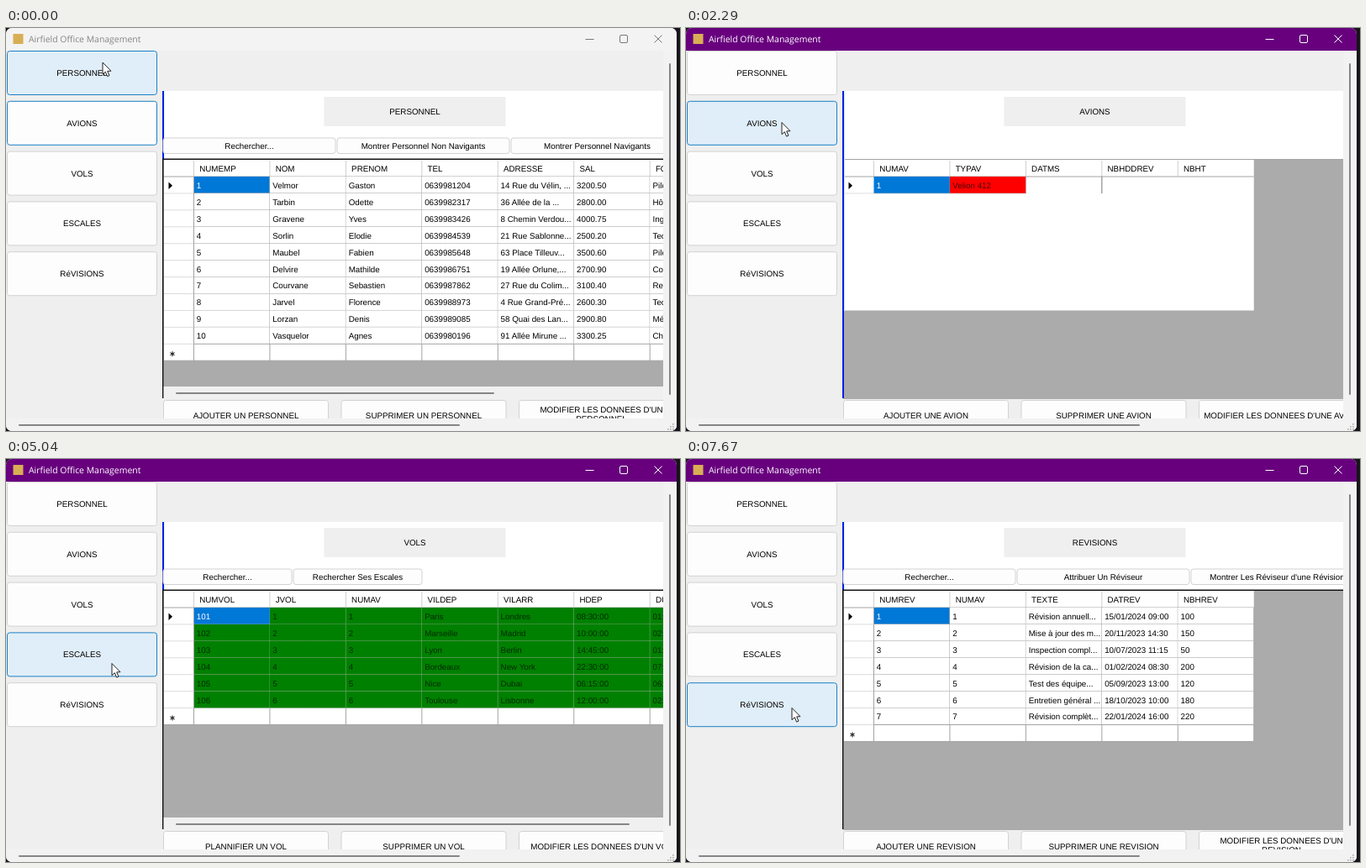
These frames come from a looping animation (802x480 px, 7.71 s). An HTML page:

```html
<!DOCTYPE html>
<html lang="fr">
<head>
<meta charset="utf-8">
<title>Airfield Office Management</title>
<style>
  html, body { margin: 0; width: 100%; height: 100%; overflow: hidden; background: #17141a; }
  svg { display: block; }
  text { font: 9.8px "Liberation Sans", Arial, sans-serif; text-rendering: geometricPrecision; white-space: pre; }
  .caption { font: 10.45px "Open Sans", "Noto Sans", sans-serif; }
  .btn rect { fill: #fdfdfd; stroke: #d2d2d2; }
  .btn.focus rect { stroke: #1a7fc4; }
  .btn.hover rect { fill: #e0eef9; stroke: #1a7fc4; }
  .btn.down rect { fill: #cce4f7; stroke: #1a609c; }
</style>
</head>
<body>
<svg id="stage" width="802" height="480" viewBox="0 0 802 480"></svg>
<script>
const LOOP = 7710;
const COL0 = 223.5, COL_W = 90.45, ROW0 = 177, ROW_H = 19.93;
const GRID_LINE = '#a3a3a3';
const MENU = ['PERSONNEL', 'AVIONS', 'VOLS', 'ESCALES', 'RéVISIONS'];

const PAGES = [
  {
    title: 'PERSONNEL', barW: 205, bar: ['Rechercher...', 'Montrer Personnel Non Navigants', 'Montrer Personnel Navigants'],
    actions: ['AJOUTER UN PERSONNEL', 'SUPPRIMER UN PERSONNEL', "MODIFIER LES DONNEES D'UN|PERSONNEL"],
    scrollEnd: 580,
    head: 'NUMEMP|NOM|PRENOM|TEL|ADRESSE|SAL|FONCTION',
    rows: [
      '1|Velmor|Gaston|0639981204|14 Rue du Vélin, ...|3200.50|Pilote',
      '2|Tarbin|Odette|0639982317|36 Allée de la ...|2800.00|Hôtesse',
      '3|Gravene|Yves|0639983426|8 Chemin Verdou...|4000.75|Ingénieur',
      '4|Sorlin|Elodie|0639984539|21 Rue Sablonne...|2500.20|Technicien',
      '5|Maubel|Fabien|0639985648|63 Place Tilleuv...|3500.60|Pilote',
      '6|Delvire|Mathilde|0639986751|19 Allée Orlune,...|2700.90|Commercial',
      '7|Courvane|Sebastien|0639987862|27 Rue du Colim...|3100.40|Responsable',
      '8|Jarvel|Florence|0639988973|4 Rue Grand-Pré...|2600.30|Technicien',
      '9|Lorzan|Denis|0639989085|58 Quai des Lan...|2900.80|Mécanicien',
      '10|Vasquelor|Agnes|0639980196|91 Allée Mirune ...|3300.25|Chef'
    ]
  },
  {
    title: 'AVIONS', barW: 205, bar: ['Rechercher...', 'Rechercher Ses Vols', 'Rechercher Ses Révisions'],
    actions: ['AJOUTER UNE AVION', 'SUPPRIMER UNE AVION', "MODIFIER LES DONNEES D'UNE AVION"],
    fill: i => i === 2 ? '#ffff00' : '#ff0000',
    ink: i => i === 2 ? '#000' : '#4d0000',
    head: 'NUMAV|TYPAV|DATMS|NBHDDREV|NBHT',
    rows: [
      '1|Velion 412|12/05/2020 14:30|100|1500',
      '2|Norvel K250|08/11/2022 09:15|200|3200',
      '3|Tarena 208|22/07/2021 16:45|50|800',
      '4|Valecrest T730 ...|30/03/2020 11:00|300|5000',
      '5|Olmarez J260|15/12/2019 18:20|150|2200',
      '6|Karvandel PLX4...|05/01/2024 07:55|120|1800',
      '7|Velion 858|19/08/2018 21:10|400|7000'
    ]
  },
  {
    title: 'VOLS', barW: 153, bar: ['Rechercher...', 'Rechercher Ses Escales'],
    actions: ['PLANNIFIER UN VOL', 'SUPPRIMER UN VOL', "MODIFIER LES DONNEES D'UN VOL"],
    scrollEnd: 741,
    fill: () => '#008000',
    ink: () => '#002a00',
    head: 'NUMVOL|JVOL|NUMAV|VILDEP|VILARR|HDEP|DURVOL',
    rows: [
      '101|1|1|Paris|Londres|08:30:00|01:15:00',
      '102|2|2|Marseille|Madrid|10:00:00|02:00:00',
      '103|3|3|Lyon|Berlin|14:45:00|01:45:00',
      '104|4|4|Bordeaux|New York|22:30:00|07:30:00',
      '105|5|5|Nice|Dubai|06:15:00|06:30:00',
      '106|6|6|Toulouse|Lisbonne|12:00:00|02:30:00'
    ]
  },
  {
    title: 'ESCALE', barX: 204.5, barW: 104, bar: ['Rechercher...'],
    actions: ['AJOUTER UN ESCALE', 'SUPPRIMER UN ESCALE', "MODIFIER LES DONNEES D'UN ESCALE"],
    head: 'NOORD|JVOL|NUMVOL|VILDEP|HARRESC|DURESC',
    rows: [
      '1|1|101|Paris|09:45:00|00:30:00',
      '2|1|101|Londres|11:00:00|00:20:00',
      '3|2|102|Marseille|11:30:00|00:40:00',
      '4|2|102|Barcelone|13:00:00|00:35:00',
      '5|2|102|Madrid|15:00:00|00:25:00',
      '6|6|106|Paris|06:00:00|01:00:00',
      '7|6|106|Moscou|13:15:00|00:45:00',
      '8|6|106|Tokyo|17:30:00|00:50:00'
    ]
  },
  {
    title: 'REVISIONS', barW: 205, bar: ['Rechercher...', 'Attribuer Un Réviseur', "Montrer Les Réviseur d'une Révision"],
    actions: ['AJOUTER UNE REVISION', 'SUPPRIMER UNE REVISION', "MODIFIER LES DONNEES D'UN|REVISION"],
    head: 'NUMREV|NUMAV|TEXTE|DATREV|NBHREV',
    rows: [
      '1|1|Révision annuell...|15/01/2024 09:00|100',
      '2|2|Mise à jour des m...|20/11/2023 14:30|150',
      '3|3|Inspection compl...|10/07/2023 11:15|50',
      '4|4|Révision de la ca...|01/02/2024 08:30|200',
      '5|5|Test des équipe...|05/09/2023 13:00|120',
      '6|6|Entretien général ...|18/10/2023 10:00|180',
      '7|7|Révision complèt...|22/01/2024 16:00|220'
    ]
  }
];

// Each step holds from its time on: page, focused, hovered and pressed menu items.
const STEPS = [
  { at: 0, page: 0, focus: 1, hover: 0, down: -1 },
  { at: 1690, hover: -1 },
  { at: 1760, hover: 1 },
  { at: 2130, down: 1, active: true },
  { at: 2210, down: -1 },
  { at: 2250, page: 1, loading: true },
  { at: 2340, loading: false },
  { at: 3080, hover: -1 },
  { at: 3130, hover: 2 },
  { at: 3560, down: 2, focus: 2 },
  { at: 3640, down: -1 },
  { at: 3720, page: 2 },
  { at: 4480, hover: -1 },
  { at: 4530, hover: 3 },
  { at: 4900, down: 3, focus: 3 },
  { at: 5000, down: -1 },
  { at: 5080, page: 3 },
  { at: 5910, hover: -1 },
  { at: 5960, hover: 4 },
  { at: 6340, down: 4, focus: 4 },
  { at: 6450, down: -1 },
  { at: 6500, page: 4 }
];

// time, x, y of the pointer tip
const POINTER = [
  [0, 115, 41], [1550, 115, 41], [1900, 114, 112.5], [2900, 114, 112.5],
  [3290, 125, 180.5], [4300, 125, 180.5], [4700, 126, 243.5], [5700, 126, 243.5], [6100, 126, 296.5]
];

const rect = (x, y, w, h, fill, more = '') =>
  `<rect x="${x}" y="${y}" width="${w}" height="${h}" fill="${fill}" ${more}/>`;
const line = (x1, y1, x2, y2, color, w = 1, more = '') =>
  `<path d="M${x1} ${y1}L${x2} ${y2}" stroke="${color}" stroke-width="${w}" ${more}/>`;
const label = (x, midY, str, fill = '#000', anchor = 'start') =>
  `<text x="${x}" y="${midY + 3.5}" fill="${fill}" text-anchor="${anchor}">${str}</text>`;

function button(x, y, w, h, str, textY = y + h / 2) {
  const lines = str.split('|');
  const top = lines.length > 1 ? textY - 6.5 : textY;
  return `<g class="btn">${rect(x, y, w, h, '#fdfdfd', 'rx="3"')}` +
    lines.map((s, i) => label(x + w / 2, top + i * 11.3, s, '#000', 'middle')).join('') + '</g>';
}

const colX = c => COL0 + c * COL_W;
const rowY = r => ROW0 + r * ROW_H;

function cell(page, r, c, str) {
  const x = colX(c), y = rowY(r), picked = !r && !c;
  const fill = picked ? '#0078d7' : page.fill ? page.fill(r) : '#fff';
  const ink = picked ? '#fff' : page.ink ? page.ink(r) : '#000';
  const dash = page.fill ? 'stroke-dasharray="1 1"' : '';
  return rect(x, y, COL_W, ROW_H, fill) +
    line(x, y + ROW_H, x + COL_W, y + ROW_H, GRID_LINE, 1, dash) +
    line(x + COL_W, y, x + COL_W, y + ROW_H, GRID_LINE, 1, dash) +
    label(x + 3.3, y + 10.4, str, ink);
}

function grid(page, loading) {
  const heads = page.head.split('|');
  const n = page.rows.length;
  const right = colX(heads.length), end = rowY(n + 1);
  let s = rect(187, 156, 596, 286, '#ababab') + rect(188, 157, right - 188, end - 157, '#fff');

  heads.forEach((h, c) => {
    s += label(colX(c) + 6.7, 167.5, h) + line(colX(c), 158, colX(c), 177, '#cfcfcf');
  });
  s += line(188, 177, right, 177, GRID_LINE);
  s += '<path d="M193.5 183.5L198 187.7L193.5 192Z"/>';

  const shown = loading ? page.rows.slice(0, 1) : page.rows;
  shown.forEach((row, r) => {
    const parts = row.split('|');
    s += (loading ? parts.slice(0, 2) : parts).map((str, c) => cell(page, r, c, str)).join('');
    s += line(188, rowY(r + 1), COL0, rowY(r + 1), '#dcdcdc');
  });

  if (loading) {
    s += line(colX(3), 177, colX(3), 197, '#777') + line(188, 156.5, 782, 156.5, GRID_LINE);
    return s + line(187, 75, 187, 441, '#0a1ee6', 2) + line(188.5, 75, 188.5, 337, '#c8f0ff');
  }

  heads.forEach((h, c) => { s += line(colX(c + 1), rowY(n), colX(c + 1), end, GRID_LINE); });
  s += line(188, end, right, end, GRID_LINE) + line(COL0, ROW0, COL0, end, GRID_LINE);
  s += '<path d="M198 385v6M195.4 386.5l5.2 3M200.6 386.5l-5.2 3" stroke="#000" ' +
    `transform="translate(0 ${rowY(n) - rowY(10) + 0.2})"/>`;
  if (page.scrollEnd) {
    s += rect(187, 427, 596, 15, '#f0f0f0') + line(203, 435, page.scrollEnd, 435, '#858585', 2, 'stroke-linecap="round"');
  }
  return s + line(186, 156.3, 782, 156.3, '#111', 1.6) + line(186.7, 156, 186.7, 441, '#111', 1.4);
}

function pageMarkup(page, loading = false) {
  let s = rect(187, 75, 596, 82, '#fff') +
    rect(378.5, 82, 216, 35, '#efefef') + label(486.5, 99.5, page.title, '#000', 'middle');
  s += line(187, 75, 187, 156, '#0a1ee6', 2) + line(188.5, 75, 188.5, 156, '#dff4ff');
  if (!loading) {
    const x0 = page.barX || 187;
    page.bar.forEach((str, i) => { s += button(x0 + i * (page.barW + 2), 131, page.barW, 18.5, str); });
  }
  s += grid(page, loading);
  page.actions.forEach((str, i) => { s += button(187.5 + i * 211.5, 443.5, 196, 36, str, 461); });
  return `<g class="page" clip-path="url(#view)">${s}</g>`;
}

function grip() {
  let s = '';
  for (let i = 0; i < 3; i++)
    for (let j = 0; j <= i; j++) s += rect(793 - j * 3, 471 + i * 3, 1.7, 1.7, '#b4b4b4');
  return s;
}

const stage = document.getElementById('stage');
stage.innerHTML =
  `<defs><clipPath id="view">${rect(185, 27, 597, 438, '#000')}</clipPath>` +
  `<clipPath id="frame">${rect(0, 0, 798, 480, '#000', 'rx="7"')}</clipPath></defs>` +
  rect(0, 0, 802, 480, '#17141a') +
  '<g clip-path="url(#frame)">' +
    rect(0, 0, 798, 480, '#efefef') + rect(782, 27, 16, 453, '#f2f2f2') + rect(0, 465, 798, 15, '#f2f2f2') +
    rect(0, 0, 798, 27, '#f3f3f3', 'id="bar"') +
    rect(8.5, 7, 12, 12, '#d8ae55') +
    '<text id="caption" class="caption" x="27" y="17">Airfield Office Management</text>' +
    '<path id="controls" fill="none" d="M689.5 13.5h10M732 8.5h6q1.5 0 1.5 1.5v6q0 1.5 -1.5 1.5h-6q-1.5 0 -1.5 -1.5v-6q0 -1.5 1.5 -1.5M771.5 8.5l9 9M780.5 8.5l-9 9"/>' +
    '<g id="menu">' + MENU.map((s, i) => button(1.5, 27.5 + i * 59.8, 178, 52, s)).join('') + '</g>' +
    PAGES.map(p => pageMarkup(p)).join('') + pageMarkup(PAGES[1], true) +
    line(790, 43, 790, 436, '#858585', 2, 'stroke-linecap="round"') +
    line(16, 473, 539, 473, '#858585', 2, 'stroke-linecap="round"') + grip() +
  '</g>' +
  '<path id="pointer" d="M0 0V14.2L3.3 11.2L5.6 16.6L8 15.6L5.7 10.4L10 10.2Z" fill="#fff" stroke="#222" stroke-width="1"/>';

const byId = id => document.getElementById(id);
const items = [...byId('menu').children];
const pages = [...document.querySelectorAll('.page')];

function pointerAt(t) {
  const next = POINTER.findIndex(k => k[0] > t);
  if (next < 0) return POINTER[POINTER.length - 1].slice(1);
  const a = POINTER[next - 1], b = POINTER[next];
  const u = (t - a[0]) / (b[0] - a[0]);
  const e = u * u * (3 - 2 * u);
  return [a[1] + (b[1] - a[1]) * e, a[2] + (b[2] - a[2]) * e];
}

function draw(t) {
  const state = Object.assign({}, ...STEPS.filter(s => s.at <= t));
  const visible = state.loading ? PAGES.length : state.page;
  pages.forEach((p, i) => { p.style.display = i === visible ? '' : 'none'; });
  items.forEach((b, i) => {
    b.setAttribute('class', 'btn' + (i === state.focus ? ' focus' : '') +
      (i === state.hover ? ' hover' : '') + (i === state.down ? ' down' : ''));
  });
  byId('bar').setAttribute('fill', state.active ? '#68007e' : '#f3f3f3');
  byId('caption').setAttribute('fill', state.active ? '#fff' : '#858585');
  byId('controls').setAttribute('stroke', state.active ? '#fff' : '#777');
  byId('pointer').setAttribute('transform', `translate(${pointerAt(t).join(' ')})`);
}

function tick() {
  draw(performance.now() % LOOP);
  requestAnimationFrame(tick);
}
tick();
</script>
</body>
</html>
```
